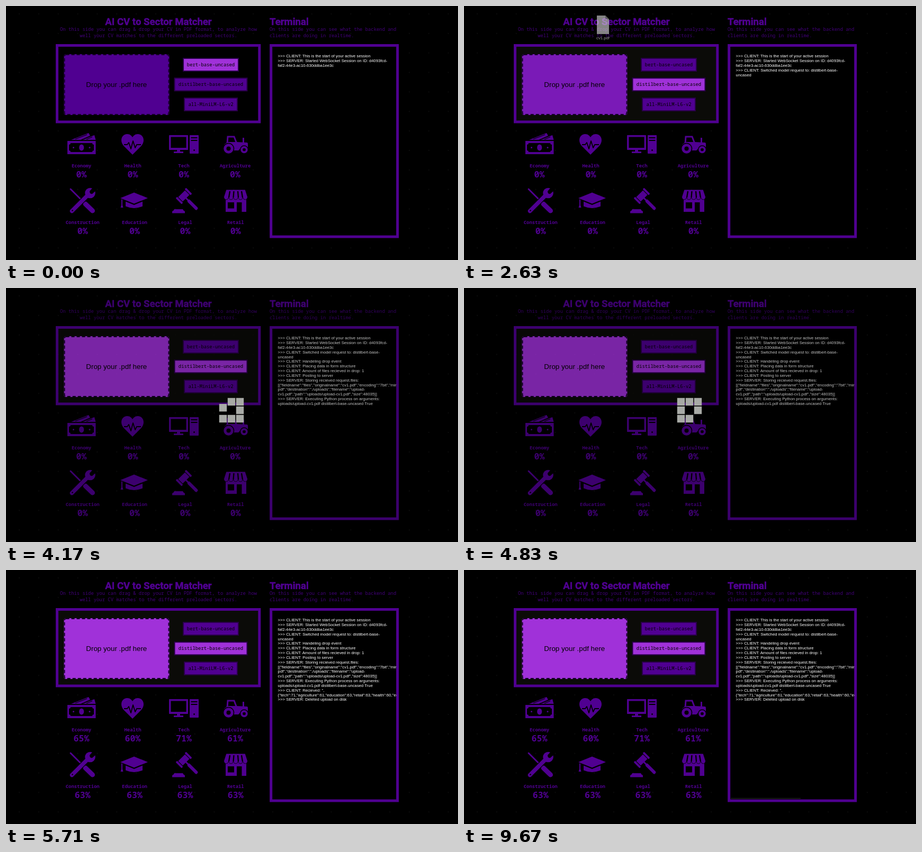
Animation, 854 px wide and 480 px high, one loop 9.71 s. Source, as an HTML page:

```html
<!DOCTYPE html>
<html lang="en">
<head>
<meta charset="utf-8">
<title>AI CV to Sector Matcher</title>
<style>
  html, body { margin: 0; width: 100%; height: 100%; overflow: hidden; background: #000; }
  svg { display: block; width: 854px; height: 480px; --p: #500091; --hot: #a031d9; }
  text { white-space: pre; }
  .p { fill: var(--p); }
  .k { fill: #000; }
  .frame { fill: none; stroke: var(--p); stroke-width: 5; }
  .line { fill: none; stroke: var(--p); }
  .cut { fill: none; stroke: #000; }
  .title { font: 700 18.6px Roboto, sans-serif; stroke: var(--p); stroke-width: .5; }
  .mono { font: 8.87px "Noto Sans Mono", monospace; }
  .sub { fill: #410078; }
  .label { font-weight: 700; }
  .score { font: 700 16.6px "Noto Sans Mono", monospace; }
  .mid { text-anchor: middle; }
  .log { font: 7.72px "Liberation Sans", Arial, sans-serif; fill: #fff; }
  .drop { font: 13.35px "Liberation Sans", Arial, sans-serif; }
</style>
</head>
<body>
<svg viewBox="0 0 854 480">
  <defs>
    <pattern id="dots" x="24" y="14" width="36.85" height="36.85" patternUnits="userSpaceOnUse">
      <circle cx="1" cy="1" r=".8" fill="#1a1a1a"/>
    </pattern>
    <clipPath id="inside"><rect x="503" y="77" width="234.5" height="356"/></clipPath>
  </defs>
  <rect width="854" height="480" fill="url(#dots)"/>
  <g id="page">
    <text class="title p mid" x="288" y="36">AI CV to Sector Matcher</text>
    <text class="title p" x="498" y="36">Terminal</text>
    <g class="mono sub">
      <text class="mid" x="288" y="47.3">On this side you can drag &amp; drop your CV in PDF format, to analyze how</text>
      <text class="mid" x="288" y="58.6">well your CV matches to the different preloaded sectors.</text>
      <text x="498" y="47.3">On this side you can see what the backend and</text>
      <text x="498" y="58.6">clients are doing in realtime.</text>
    </g>

    <rect id="panel" class="frame" x="96.5" y="74.5" width="382.3" height="144.5"/>
    <rect class="frame" x="500.700" y="74.5" width="239" height="361.5" style="fill:#000"/>

    <rect id="zone" x="109.5" y="91" width="199" height="115" rx="4"/>
    <rect x="110.5" y="92" width="197" height="113" rx="3" fill="none" stroke="#15002a" stroke-width="2" stroke-dasharray="6 4"/>
    <text class="drop mid" x="208.8" y="152.7">Drop your .pdf here</text>
    <g id="models"></g>

    <!-- economy -->
    <path class="p" d="M116 255h53.5v25h-53.5z M123 253l33-13 3 5-18 8z M145 253l22-9 2.5 9z"/>
    <path class="k" d="M122 259h41q0 3 3 3v11q-3 0-3 3h-41q0-3-3-3v-11q3 0 3-3z"/>
    <ellipse class="p" cx="142.7" cy="267.5" rx="4.6" ry="6"/>
    <circle class="p" cx="127.5" cy="267.5" r="1.5"/><circle class="p" cx="158" cy="267.5" r="1.5"/>
    <path class="cut" stroke-width="1.3" d="M131 251.5l22-8.5M152 252l11-4.5"/>
    <!-- health -->
    <path class="p" d="M239 281L222 264C214 254 219 242 229 242C234 242 237 245 239 248C241 245 244 242 249 242C259 242 264 254 256 264Z"/>
    <path class="cut" stroke-width="1.8" stroke-linejoin="round" d="M223 262h6l3-4 4 12 4-15 4 13 3-6h8"/>
    <!-- tech -->
    <path class="p" fill-rule="evenodd" d="M309 244h34q1 0 1 1v26q0 1-1 1h-34q-1 0-1-1v-26q0-1 1-1zM311.5 247.5v20.5h29v-20.5zM323 272h6v3h6v3h-18v-3h6zM348 244h15q1 0 1 1v33q0 1-1 1h-15q-1 0-1-1v-33q0-1 1-1zM349.5 248v2h12v-2zM349.5 253v2h12v-2z"/>
    <circle class="k" cx="355.5" cy="272.5" r="1.4"/>
    <!-- agriculture -->
    <path class="line" stroke-width="3" d="M418 260l1-13h12l5 13"/>
    <path class="p" d="M412 262l6-5h18l19 1q2 0 2 3v6h-12l-6 6h-9l-7-11h-10zM447 249h3v10h-3z"/>
    <g stroke="#000" stroke-width="1.5">
      <circle class="p" cx="420.5" cy="269.5" r="10"/><circle class="p" cx="450" cy="271.5" r="7.5"/>
    </g>
    <circle class="k" cx="420.5" cy="269.5" r="4"/><circle class="k" cx="450" cy="271.5" r="2.8"/>
    <!-- construction -->
    <g stroke-linecap="round">
      <path class="line" stroke-width="3" d="M122 346l23 23"/>
      <path class="line" stroke-width="9" d="M150 374l13.5 13"/>
      <path class="cut" stroke-width="10" d="M126 386l28-28"/>
      <path class="line" stroke-width="7.5" d="M124.5 387.5l31-31"/>
    </g>
    <circle class="p" cx="159" cy="353.5" r="9.8"/>
    <path class="k" d="M158 350l8-9 6 6-9 8q-5 1-5-5z"/>
    <circle class="k" cx="125.5" cy="386.5" r="1.3"/>
    <!-- education -->
    <path class="p" d="M216 363l26-10.5 26 10.5-26 10.5zM226 369.5l16 6.5 16-6.5v9q-16 7-32 0zM218 365l2 1v10l1.5 5h-5l1.5-5z"/>
    <!-- legal -->
    <g class="p" transform="translate(336 359) rotate(45)">
      <rect x="-6" y="-9" width="12" height="18"/>
      <rect x="-8" y="-14" width="16" height="4" rx="1.5"/><rect x="-8" y="10" width="16" height="4" rx="1.5"/>
      <rect x="5" y="-1.5" width="8" height="3"/><rect x="11" y="-3" width="25" height="6" rx="2.5"/>
    </g>
    <path class="p" d="M314 391.5v-3q0-1.5 2-1.5l2-3h16l2 3q2 0 2 1.5v3z"/>
    <!-- retail -->
    <path class="p" fill-rule="evenodd" d="M415 362h39v27h-39zM419 371v11.5h12v-11.5zM436 371v18h9.5v-18z"/>
    <path class="p" stroke="#000" stroke-width=".8" d="M416 347h36l4.500 14q-1 5-4.500 5t-4.500-4q-1 4-4.500 4t-4.500-4q-1 4-4.500 4t-4.500-4q-1 4-4.500 4t-4.500-4q-1 4-4.500 4t-4.500-5z"/>
    <path class="cut" stroke-width="2.3" d="M423 350l-2 12M430.5 350l-1 12M438 350l1 12M445 350l2 12"/>

    <g id="sectors"></g>
    <g id="log" class="log" clip-path="url(#inside)"></g>
    <path id="bar" d="M504 431.5h132" stroke="#a0a0a0"/>
  </g>
  <g id="file" opacity=".6">
    <path fill="#ddd" d="M5 1h16l7 7v28h-23z"/>
    <path fill="#999" d="M21 1v7h7z"/>
    <text class="log mid" x="16.5" y="46">cv1.pdf</text>
  </g>
  <g id="loader" fill="#a8aaa6"></g>
</svg>
<script>
const LOOP = 9710, SWITCH = 1630, UPLOAD = 3460, DONE = 5460;
const $ = id => document.getElementById(id);

function add(parent, tag, attrs, content = '') {
  const el = document.createElementNS('http://www.w3.org/2000/svg', tag);
  for (const k in attrs) el.setAttribute(k, attrs[k]);
  el.textContent = content;
  return parent.appendChild(el);
}
const show = (el, on) => el.style.display = on ? '' : 'none';
const ramp = (t, a, b) => Math.min(1, Math.max(0, (t - a) / (b - a)));
const ease = p => p < .5 ? 4 * p ** 3 : 1 - 4 * (1 - p) ** 3;
const mix = (a, b, p) => a + (b - a) * p;

const models = [['bert-base-uncased', 106, 111], ['distilbert-base-uncased', 139, 148.3], ['all-MiniLM-L6-v2', 102, 186]]
  .map(([name, w, y]) => {
    const box = add($('models'), 'rect', { x: 388 - w / 2, y: y - 12, width: w - 2, height: 24, stroke: '#280048', 'stroke-width': 2 });
    add($('models'), 'text', { class: 'mono mid', x: 387, y: y + 3 }, name);
    return box;
  });

const scores = [
  ['Economy', 142.5, 65], ['Health', 239.5, 60], ['Tech', 336, 71], ['Agriculture', 433, 61],
  ['Construction', 144.7, 63], ['Education', 243, 63], ['Legal', 338.5, 63], ['Retail', 433.7, 63]
].map(([name, x, value], i) => {
  const y = i < 4 ? 304.5 : 411.5;
  add($('sectors'), 'text', { class: 'mono label p mid', x, y }, name);
  return { value, el: add($('sectors'), 'text', { class: 'score p mid', x, y: y + 19 }) };
});

const lines = `>>> CLIENT: This is the start of your active session
>>> SERVER: Started WebSocket Session on ID: d4093fcd-
faf2-44e3-ac10-630ddba1ee3c
>>> CLIENT: Switched model request to: distilbert-base-
uncased
>>> CLIENT: Handeling drop event
>>> CLIENT: Placing data in form structure
>>> CLIENT: Amount of files recieved in drop: 1
>>> CLIENT: Posting to server
>>> SERVER: Storing recieved request.files:
[{"fieldname":"files","originalname":"cv1.pdf","encoding":"7bit","mimetype":"application/
pdf","destination":"./uploads","filename":"upload-
cv1.pdf","path":"uploads/upload-cv1.pdf","size":48035}]
>>> SERVER: Executing Python process on arguments:
uploads/upload-cv1.pdf distilbert-base-uncased True
>>> CLIENT: Recieved: '',
{"tech":71,"agriculture":61,"education":63,"retail":63,"health":60,"economy":65}
>>> SERVER: Deleted upload on disk`.split('\n')
  .map((s, i) => add($('log'), 'text', { x: 513.6, y: 97.3 + i * 8.83 }, s));

// Seven tiles slide clockwise around an eight-cell ring, one at a time.
const ring = [[0, 0], [1, 0], [2, 0], [2, 1], [2, 2], [1, 2], [0, 2], [0, 1]];
const tiles = ring.slice(1).map(() => add($('loader'), 'rect', { width: 14.4, height: 14.4 }));

function drawLoader(t) {
  const step = 190, since = t - 3495 + step * 8;
  const gap = ((3 - Math.floor(since / step)) % 8 + 8) % 8;
  const p = ease(ramp(since % step, 45, step));
  tiles.forEach((tile, i) => {
    const from = ring[(gap + 1 + i) % 8], to = i === 6 ? ring[gap] : from;
    tile.setAttribute('x', 402.8 + 16 * mix(from[0], to[0], p));
    tile.setAttribute('y', 207.8 + 16 * mix(from[1], to[1], p));
  });
}

const drag = [[2380, 246, -40], [2750, 246, 44], [2880, 246, 44], [2960, 216, 105], [3040, 226, 80], [3250, 226, 80]];

function drawFile(t) {
  const i = drag.findIndex(k => t < k[0]);
  show($('file'), i > 0);
  if (i < 1) return;
  const [a, b] = [drag[i - 1], drag[i]], p = ramp(t, a[0], b[0]);
  $('file').setAttribute('transform', `translate(${mix(a[1], b[1], p)} ${mix(a[2], b[2], p)})`);
}

function draw(t) {
  const busy = t >= UPLOAD && t < DONE;
  $('page').setAttribute('opacity', busy ? .76 : 1);
  show($('loader'), busy);
  if (busy) drawLoader(t);
  drawFile(t);

  const lit = ramp(t, 40, 210), hot = ramp(t, 2500, 2750);
  $('panel').style.fill = `rgb(${11 * lit},${11 * lit},${8 * lit})`;
  $('zone').style.fill = `rgb(${mix(80, 160, hot)},${mix(0, 49, hot)},${mix(145, 217, hot)})`;

  const active = t < SWITCH ? 0 : 1;
  models.forEach((m, i) => m.style.fill = i === active ? 'var(--hot)' : 'var(--p)');
  scores.forEach(s => s.el.textContent = (t < DONE ? 0 : s.value) + '%');

  const count = t < SWITCH ? 3 : t < UPLOAD ? 5 : t < DONE ? 15 : 18;
  lines.forEach((el, i) => show(el, i < count));

  const bar = ease(ramp(t, 6750, 7380)) - ease(ramp(t, 8080, 8670)) + ease(ramp(t, 9420, 10050));
  $('bar').setAttribute('opacity', bar);
}

function tick() {
  draw(performance.now() % LOOP);
  requestAnimationFrame(tick);
}
tick();
</script>
</body>
</html>
```
